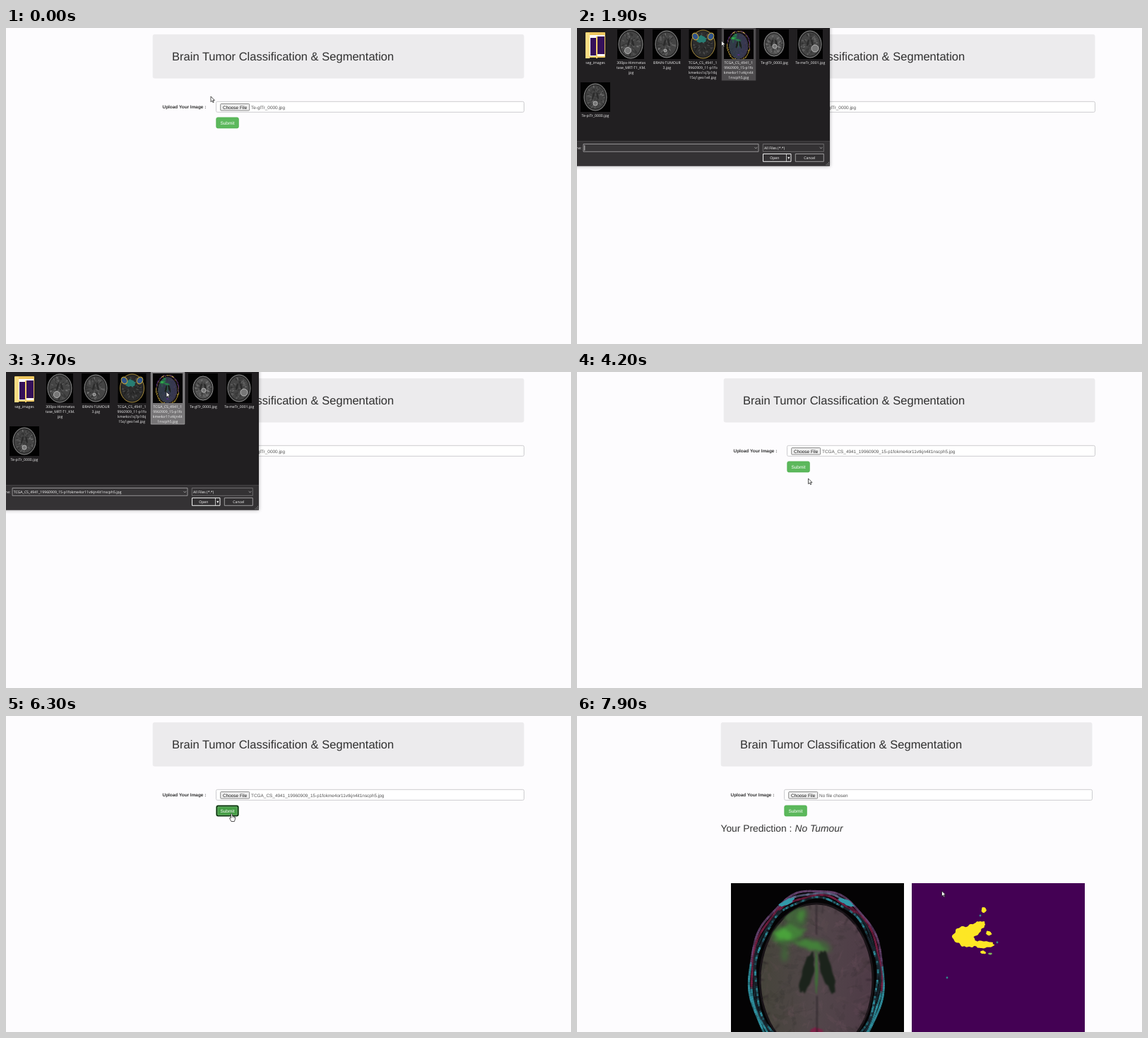
These frames come from a looping animation (800x448 px, 8000 ms). An HTML page with a canvas:

```html
<!DOCTYPE html>
<html lang="en">
<head>
<meta charset="utf-8">
<title>Brain Tumor Classification &amp; Segmentation</title>
<style>
html, body { margin: 0; width: 100%; height: 100%; overflow: hidden; background: #fdfcfe; }
canvas { display: block; width: 800px; height: 448px; }
</style>
</head>
<body>
<canvas id="stage" width="800" height="448"></canvas>
<script>
const ctx = document.getElementById('stage').getContext('2d');
ctx.textRendering = 'geometricPrecision';
const LOOP = 8000, TAU = Math.PI * 2;
const ARIAL = '"Liberation Sans", Arial, sans-serif';
const UI = '"Open Sans", "Noto Sans", sans-serif';
const PICKED = 'TCGA_CS_4941_19960909_15-p1fokme4or11vtkjn4it1nscph5.jpg';
const TIMES = { open: 1400, select: 3100, close: 3880, press: 6200, result: 6700 };

const clamp = v => Math.max(0, Math.min(1, v));
const ease = v => v * v * (3 - 2 * v);

function randomizer(seed) {
  return () => (seed = (seed * 16807) % 2147483647) / 2147483647;
}

function layer(w, h, paint) {
  const c = document.createElement('canvas');
  c.width = w;
  c.height = h;
  paint(c.getContext('2d'));
  return c;
}

function rect(g, x, y, w, h, fill, line, r = 0, lw = 1) {
  g.beginPath();
  g.roundRect(x, y, w, h, r);
  if (fill) { g.fillStyle = fill; g.fill(); }
  if (line) { g.strokeStyle = line; g.lineWidth = lw; g.stroke(); }
}

function text(g, str, x, y, font, color, align = 'left') {
  g.font = font;
  g.fillStyle = color;
  g.textAlign = align;
  g.fillText(str, x, y);
}

function oval(g, x, y, rx, ry, fill, line, lw = 1, turn = 0) {
  g.beginPath();
  g.ellipse(x, y, rx, ry, turn, 0, TAU);
  if (fill) { g.fillStyle = fill; g.fill(); }
  if (line) { g.strokeStyle = line; g.lineWidth = lw; g.stroke(); }
}

// Ellipse with an uneven edge
function ragged(g, x, y, rx, ry, fill, turn = 0, rough = 0.12) {
  g.save();
  g.translate(x, y);
  g.rotate(turn);
  g.beginPath();
  for (let a = 0; a < TAU; a += 0.1) {
    const r = 1 + rough * (Math.sin(3 * a + x) + Math.sin(5 * a + y) + Math.sin(9 * a + x + y)) / 2;
    g.lineTo(rx * r * Math.cos(a), ry * r * Math.sin(a));
  }
  g.closePath();
  g.fillStyle = fill;
  g.fill();
  g.restore();
}

// Colour brain slice in a 245 unit square
function colorScan(g, c) {
  const rnd = randomizer(77), cx = 121, cy = 134, rx = 95, ry = 124;
  rect(g, 0, 0, 245, 245, '#040304');

  // Skull: thin dabs in four shells, hue chosen by height
  for (let i = 0; i < 240; i++) {
    const a = i / 240 * TAU, up = -Math.sin(a);
    const shells = [
      up > 0.15 ? c.rim : c.glow,
      up > 0.87 ? c.top : up > -0.15 ? c.red : c.glow,
      up > 0.8 ? c.red : c.deep,
      rnd() > 0.55 ? c.glow : c.deep
    ];
    shells.forEach((color, k) => {
      const s = 1 - 0.03 * k + 0.012 * Math.sin(a * 9 + k);
      g.globalAlpha = 0.35 + 0.5 * rnd();
      g.beginPath();
      g.ellipse(cx, cy, rx * s, ry * s, 0, a, a + 0.05);
      g.strokeStyle = color;
      g.lineWidth = 3;
      g.stroke();
    });
  }
  g.globalAlpha = 1;
  for (const s of [-1, 1]) ragged(g, cx + s * 42, 27, 12, 3.5, c.glow, s * 0.45);

  const tissue = g.createLinearGradient(38, 0, 204, 0);
  [c.left, c.middle, c.right].forEach((color, i) => tissue.addColorStop(i / 2, color));
  oval(g, cx, 137, 80, 108, tissue, '#171216', 3);
  g.save();
  g.clip();
  for (let i = 0; i < 420; i++) {
    g.globalAlpha = 0.04 + rnd() * 0.12;
    ragged(g, 36 + rnd() * 170, 26 + rnd() * 215, 2 + rnd() * 8, 1 + rnd() * 3, i % 2 ? c.fold : c.fleck, rnd() * 3, 0.3);
  }
  g.globalAlpha = 0.5;
  g.filter = 'blur(1px)';
  for (let i = 0; i < 26; i++) {
    const a = i / 26 * TAU;
    g.save();
    g.translate(cx, 137);
    g.scale(80, 108);
    g.rotate(a);
    rect(g, 0.88 + 0.05 * (i % 2), -0.008, 0.12, 0.016, '#191318');
    g.restore();
  }

  g.filter = 'blur(3px)';
  g.globalAlpha = 0.75;
  ragged(g, 92, 48, 17, 16, c.halo);
  ragged(g, 78, 74, 22, 14, c.halo);
  ragged(g, 118, 88, 25, 8, c.halo, 0.2);
  ragged(g, 76, 100, 5, 12, c.halo);
  g.filter = 'blur(2px)';
  ragged(g, 82, 71, 21, 10, c.tumor, -0.2, 0.25);
  ragged(g, 99, 46, 5, 8, c.tumor, 0.3, 0.25);
  ragged(g, 113, 88, 20, 6, c.tumor, 0.25, 0.25);
  ragged(g, 75, 73, 12, 7, c.hot, 0.2, 0.25);
  g.globalAlpha = 1;
  g.filter = 'blur(1px)';
  ragged(g, 108, 128, 8, 29, c.cavity, 0.25);
  ragged(g, 136, 125, 8, 31, c.cavity, -0.28);
  ragged(g, 121, 126, 2.2, 30, c.halo);
  ragged(g, cx, 211, 9, 6, c.red);
  rect(g, cx - 0.7, 28, 1.4, 45, '#282026');
  rect(g, cx, 160, 1.4, 85, '#282026');
  g.restore();
}

const resultPalette = {
  rim: '#6d4876', glow: '#3298a8', top: '#6c7296', red: '#7d2046', deep: '#1d2b35',
  left: '#45443a', middle: '#52464a', right: '#4e3a46', fold: '#2a2a27', fleck: '#7a5b68',
  halo: '#3f6b38', tumor: '#458b3a', hot: '#4cae3c', cavity: '#1b231b'
};
const filePalette = {
  ...resultPalette, rim: '#713d86', glow: '#bda139', top: '#98813e', red: '#57318c', deep: '#352b1d',
  left: '#303c45', middle: '#353b50', right: '#393650', halo: '#28724a', tumor: '#269549', hot: '#3bc253'
};

const scan = layer(245, 245, g => colorScan(g, resultPalette));
const fileScan = layer(245, 245, g => colorScan(g, filePalette));

const mask = layer(245, 245, g => {
  const YELLOW = '#fde725', TEAL = '#2f8c8c';
  rect(g, 0, 0, 245, 245, '#440154');
  ragged(g, 74, 75, 15, 14, YELLOW);
  ragged(g, 86, 67, 12, 9, YELLOW, -0.5);
  ragged(g, 96, 60, 8, 6, YELLOW, -0.4);
  ragged(g, 102, 87, 14, 5, YELLOW);
  ragged(g, 82, 84, 10, 7, YELLOW);
  ragged(g, 102, 38, 3.4, 4, YELLOW);
  ragged(g, 109, 71, 4, 3, YELLOW, 0.4);
  ragged(g, 101, 98, 4, 2.2, YELLOW, 0.2);
  ragged(g, 111, 100, 2.8, 1.4, '#7fb85a');
  for (const [x, y] of [[97, 46], [121, 84], [50, 134]]) oval(g, x, y, 1.4, 1.4, TEAL);
});

const columnX = i => 26 + 50.7 * i;

// Grey brain thumbnail with seeded folds and one bright lesion
function grayScan(g, x, y, { w = 40, rx = 16, tone = 78, spot = [0, 9, 3], tint = '#8a8a8a' }) {
  const rnd = randomizer(Math.round(x * 31 + y));
  const ry = rx + 3, gray = v => `rgb(${v},${v},${v})`;
  rect(g, x - w / 2, y - 21, w, 42, '#020202');
  oval(g, x, y, rx, ry, gray(tone - 10), tint, 1);
  oval(g, x, y, rx - 1.6, ry - 1.6, null, '#1c1c1c', 0.9);
  for (let i = 0; i < 70; i++) {
    const a = rnd() * TAU, k = Math.sqrt(rnd()) * 0.8;
    oval(g, x + rx * k * Math.cos(a), y + ry * k * Math.sin(a), 1.8, 0.8, i % 2 ? '#0003' : '#fff2', null, 0, a);
  }
  for (const s of [-1, 1]) oval(g, x + s * 3, y - 2, 1.3, 5, '#2a2a2a', null, 0, -s * 0.25);
  rect(g, x - 0.3, y - ry + 3, 0.6, 12, '#333');
  const [dx, dy, r] = spot;
  oval(g, x + dx, y + dy, r, r, '#777', '#bbb', 0.9);
}

function folder(g) {
  rect(g, 12, 6, 28, 36, '#eec75f', null, 1);
  rect(g, 18, 10, 21, 30, '#fff');
  rect(g, 19, 14, 8, 25, '#35105a');
  rect(g, 29, 12, 10, 25, '#35105a');
  rect(g, 12, 7, 6, 36, '#f9dc83');
  rect(g, 27, 12, 2, 31, '#f3d06c');
}

const thumbs = layer(360, 130, g => {
  folder(g);
  grayScan(g, 76, 23, { w: 38, rx: 17, spot: [-4, 9, 4.5] });
  grayScan(g, 127, 23, { spot: [-2, 9, 2] });
  grayScan(g, 178.5, 23, { rx: 17, tone: 55, tint: '#a88b39', spot: [-11, -11, 2] });
  ragged(g, 176, 16, 7, 5, '#287d73');
  for (const s of [-1, 1]) oval(g, 178.5 + s * 11, 12, 4, 5, '#30548a', '#bca03d', 1.2, s * 0.5);
  g.drawImage(fileScan, 208, 2, 42, 42);
  grayScan(g, 279, 23, { w: 42, rx: 14, tone: 92, spot: [1, 3, 3] });
  grayScan(g, 330, 23, { w: 36, spot: [7, 6, 5] });
  grayScan(g, 26, 98, { w: 42 });
});

const labels = [
  'seg_images', '300px-Himmetas|tase_MRT-T1_KM.|jpg', 'BRAIN-TUMOUR|3.jpg',
  'TCGA_CS_4941_1|9960909_11-p1fo|kme4os1q7p1tbj|15q1geo1eil.jpg',
  'TCGA_CS_4941_1|9960909_15-p1fo|kme4or11vtkjn4it|1nscph5.jpg',
  'Te-glTr_0000.jpg', 'Te-meTr_0001.jpg', 'Te-piTr_0000.jpg'
];

// Pointer moves: start time, end time, destination
const home = [290, 97];
const moves = [
  [100, 900, 322, 108], [1400, 1900, 204.5, 18], [1900, 2700, 227, 28],
  [3750, 4200, 327.5, 151], [4200, 4500, 319.5, 138.5], [7050, 7900, 516.5, 248]
];

function pointer(t) {
  return moves.reduce(([x, y], [from, to, x1, y1]) => {
    const k = ease(clamp((t - from) / (to - from)));
    return [x + (x1 - x) * k, y + (y1 - y) * k];
  }, home);
}

function drawPage(t, hover) {
  const done = t >= TIMES.result;
  const small = `6.43px ${ARIAL}`, title = `13.8px ${ARIAL}`;
  rect(ctx, 0, 0, 800, 448, '#fdfcfe');
  ctx.save();
  if (done) ctx.translate(-4, 0);
  rect(ctx, 207.7, 9, 525.8, 62.5, '#ecebed', null, 3);
  text(ctx, 'Brain Tumor Classification & Segmentation', 235, 45.7, `16.55px ${ARIAL}`, '#303030');
  text(ctx, 'Upload Your Image :', 221.5, 114.2, `bold 6.43px ${ARIAL}`, '#333');
  rect(ctx, 297.5, 104.3, 436, 15, '#fff', '#cccccf', 2);
  rect(ctx, 303.7, 107.5, 41, 9.5, '#efefef', '#6c6c6c', 1, 0.8);
  text(ctx, 'Choose File', 307, 114.5, small, '#111');
  const file = done ? 'No file chosen' : t >= TIMES.close ? PICKED : 'Te-glTr_0000.jpg';
  text(ctx, file, 347, 114.5, small, '#555');
  const over = hover && !done;
  rect(ctx, 297.8, 126.9, 31.5, 15, over ? '#449d44' : '#5cb85c', over ? '#398439' : '#4cae4c', 2, 0.8);
  if (t >= TIMES.press && !done) {
    rect(ctx, 298.5, 127.5, 30, 14, null, '#102b13', 1.5, 1.4);
    rect(ctx, 299.9, 128.9, 27.2, 11.2, null, '#8cc48c', 0.5, 0.5);
  }
  text(ctx, 'Submit', 303.5, 136.8, small, '#fff');
  ctx.restore();
  if (!done) return;
  text(ctx, 'Your Prediction : ', 203.5, 164, title, '#333');
  text(ctx, 'No Tumour', 308.5, 164, `italic ${title}`, '#333');
  ctx.drawImage(scan, 218, 237);
  ctx.drawImage(mask, 474, 237);
}

function chevron(x, y) {
  ctx.beginPath();
  ctx.moveTo(x - 1.8, y - 0.9);
  ctx.lineTo(x, y + 0.9);
  ctx.lineTo(x + 1.8, y - 0.9);
  ctx.strokeStyle = '#ccc';
  ctx.lineWidth = 0.7;
  ctx.stroke();
}

function drawDialog(t, [px, py]) {
  const alpha = clamp((t - TIMES.open) / 150) * clamp((TIMES.close + 150 - t) / 150);
  if (!alpha) return;
  const font = `5.15px ${UI}`;
  const selected = t >= TIMES.select;
  ctx.save();
  ctx.globalAlpha = alpha;
  ctx.shadowColor = '#0005';
  ctx.shadowBlur = 5;
  rect(ctx, -10, -10, 368, 205.5, '#211f21');
  ctx.shadowBlur = 0;
  rect(ctx, 0, 160.5, 358, 35, '#343234');
  rect(ctx, 0, 160, 358, 0.7, '#4a484a');
  labels.forEach((label, i) => {
    const row = Math.floor(i / 7), x = columnX(i % 7), top = row * 75;
    const inside = Math.abs(px - x) < 24.4 && py > top && py < top + 74;
    if (selected && i === 4) rect(ctx, x - 23.5, 0.5, 47.5, 73.5, '#777577', '#aaa8aa', 0, 0.8);
    else if (inside) rect(ctx, x - 24, top, 48.5, 74.5, '#4e4c4e');
    label.split('|').forEach((line, n) => text(ctx, line, x, top + 51.4 + n * 7, font, '#f3f3f3', 'center'));
  });
  ctx.drawImage(thumbs, 0, 0);
  text(ctx, 'ne:', 6.5, 171.7, font, '#eee', 'right');
  rect(ctx, 9, 164.5, 248, 10.8, '#383638', '#aaa8aa', 0, 0.8);
  chevron(253.3, 170);
  if (selected) text(ctx, PICKED, 10.7, 171.8, font, '#fff');
  else if ((t - 1700) % 1060 < 530) rect(ctx, 10.5, 166.3, 0.7, 7.4, '#fff');
  rect(ctx, 263.3, 164.5, 86, 10.8, '#343234', '#858385', 0, 0.7);
  text(ctx, 'All Files (*.*)', 265, 171.8, font, '#fff');
  chevron(345.5, 170);
  rect(ctx, 263.5, 178.5, 39.5, 10.8, '#333133', '#f2f2f2', 0, 1);
  rect(ctx, 296, 179, 0.8, 10, '#ddd');
  text(ctx, 'Open', 279.8, 185.7, font, '#fff', 'center');
  text(ctx, '▾', 299.7, 185.7, '6px "DejaVu Sans", sans-serif', '#fff', 'center');
  rect(ctx, 309.3, 178.5, 40, 10.8, '#333133', '#aaa8aa', 0, 0.9);
  text(ctx, 'Cancel', 329.3, 185.7, font, '#fff', 'center');
  for (let row = 0; row < 3; row++) {
    for (let col = 0; col < 3 - row; col++) rect(ctx, 356 - col * 1.7, 193.5 - row * 1.7, 0.9, 0.9, '#999');
  }
  ctx.restore();
}

const ARROW = new Path2D('M0 0V16L3.8 12.6L6.2 18L8.8 17L6.5 11.6H11.3Z');
const HAND = new Path2D('M-2 1Q0-2 2 1V7L9 9Q12 10 11 14L8 23H-1L-6 14Q-6 10-2 13Z');

function drawPointer([x, y], hand) {
  const shape = hand ? HAND : ARROW;
  ctx.save();
  ctx.translate(x, y);
  ctx.scale(0.48, 0.48);
  ctx.lineJoin = 'round';
  ctx.strokeStyle = '#111';
  ctx.lineWidth = 1.5;
  ctx.fillStyle = '#fff';
  ctx.fill(shape);
  ctx.stroke(shape);
  if (hand) for (const k of [2, 5, 8]) rect(ctx, k, 8 + k * 0.2, 0.8, 4, '#111');
  ctx.restore();
}

function draw(t) {
  const tip = pointer(t);
  const left = t >= TIMES.result ? 293 : 297;
  const hover = tip[0] > left && tip[0] < left + 33 && tip[1] > 126 && tip[1] < 142;
  drawPage(t, hover);
  drawDialog(t, tip);
  drawPointer(tip, hover);
}

const start = performance.now();
function tick() {
  draw((performance.now() - start) % LOOP);
  requestAnimationFrame(tick);
}
tick();
</script>
</body>
</html>
```
